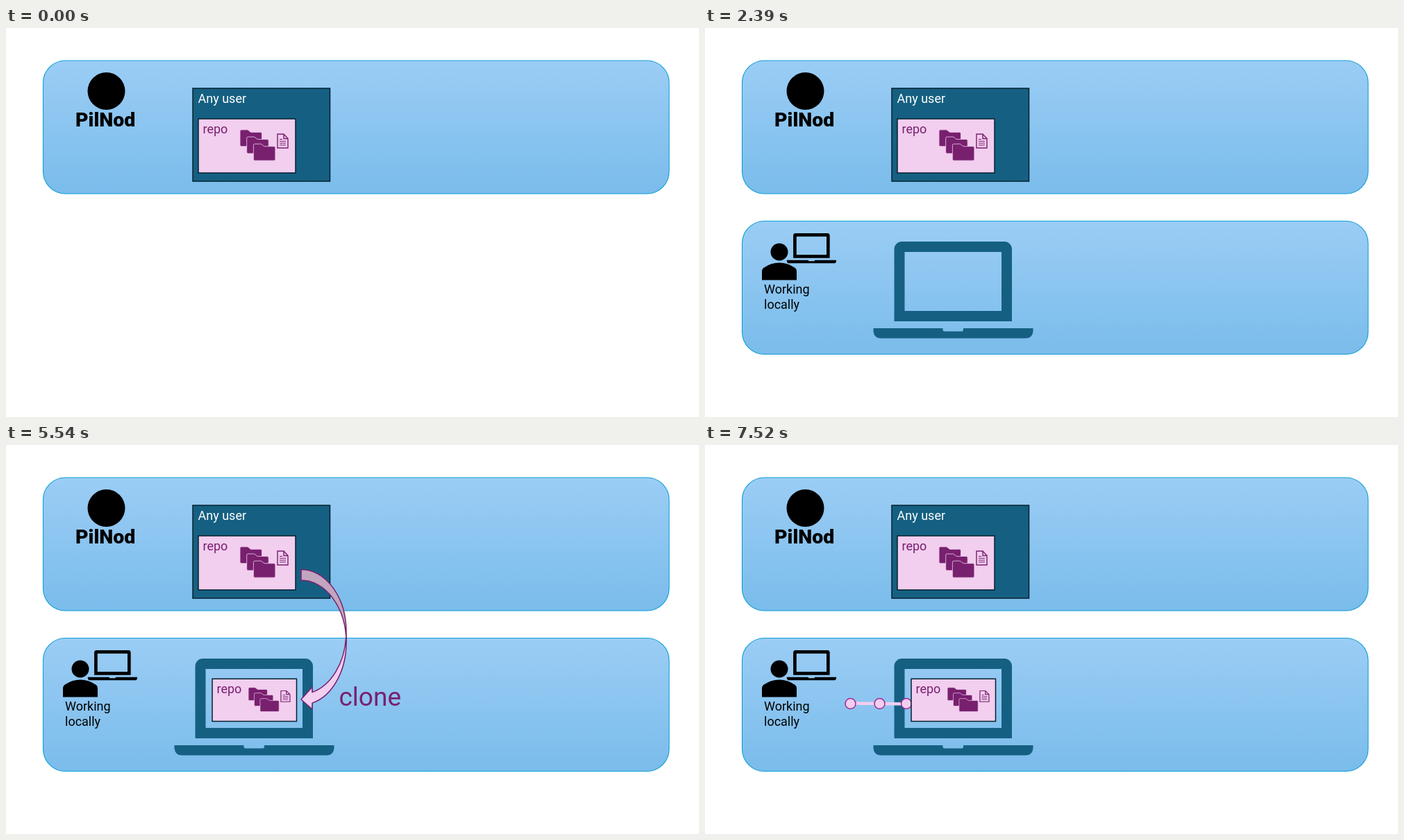
An HTML page with a canvas for the animation above (8000 ms loop, 998 px wide and 561 px high).

```html
<!DOCTYPE html>
<html lang="en">
<head>
<meta charset="utf-8">
<title>Cloning a repo</title>
<style>
  html, body { margin: 0; width: 100%; height: 100%; overflow: hidden; background: #fff; }
  canvas { display: block; }
</style>
</head>
<body>
<canvas id="stage" width="998" height="561"></canvas>
<script>
const ctx = document.getElementById('stage').getContext('2d');
const LOOP = 8000;
const STARTS = { local: 500, clone: 3650, history: 6800 };
const TEAL = '#156082', PURPLE = '#78206e', PINK = '#f2ceef', DARK = '#06202e';

function paint(fill, stroke, width = 1.5) {
  if (fill) { ctx.fillStyle = fill; ctx.fill(); }
  if (stroke) { ctx.strokeStyle = stroke; ctx.lineWidth = width; ctx.stroke(); }
}

function box(x, y, w, h, fill, stroke, width) {
  ctx.beginPath();
  ctx.rect(x, y, w, h);
  paint(fill, stroke, width);
}

function disc(x, y, r, fill, stroke, width) {
  ctx.beginPath();
  ctx.arc(x, y, r, 0, 2 * Math.PI);
  paint(fill, stroke, width);
}

function label(text, x, y, color, size = 18, weight = 400) {
  ctx.font = `${weight} ${size}px Roboto, sans-serif`;
  ctx.fillStyle = color;
  ctx.fillText(text, x, y);
}

function placed(x, y, sx, sy, draw) {
  ctx.save();
  ctx.translate(x, y);
  ctx.scale(sx, sy);
  draw();
  ctx.restore();
}

function panel(y) {
  const shade = ctx.createLinearGradient(0, y, 0, y + 192);
  shade.addColorStop(0, '#9bcdf5');
  shade.addColorStop(1, '#7abceb');
  ctx.beginPath();
  ctx.roundRect(53.5, y, 901.5, 192, 32);
  paint(shade, '#0f9ed5', 1.1);
}

function folder(x, y) {
  ctx.beginPath();
  ctx.moveTo(x, y + 2);
  ctx.quadraticCurveTo(x, y, x + 2, y);
  ctx.lineTo(x + 11, y);
  ctx.lineTo(x + 15.5, y + 3.5);
  ctx.lineTo(x + 29.5, y + 3.5);
  ctx.quadraticCurveTo(x + 31.5, y + 3.5, x + 31.5, y + 5.5);
  ctx.lineTo(x + 31.5, y + 22);
  ctx.quadraticCurveTo(x + 31.5, y + 24, x + 29.5, y + 24);
  ctx.lineTo(x + 2, y + 24);
  ctx.quadraticCurveTo(x, y + 24, x, y + 22);
  ctx.closePath();
  paint(PURPLE, PINK, 0.8);
}

function page(x, y) {
  ctx.beginPath();
  ctx.moveTo(x, y);
  ctx.lineTo(x + 9, y);
  ctx.lineTo(x + 15, y + 6.5);
  ctx.lineTo(x + 15, y + 20);
  ctx.lineTo(x, y + 20);
  ctx.closePath();
  ctx.moveTo(x + 9, y);
  ctx.lineTo(x + 9, y + 6.5);
  ctx.lineTo(x + 15, y + 6.5);
  paint(null, PURPLE, 1.4);
  ctx.beginPath();
  [7.5, 10.3, 13.1, 15.9].forEach((dy, i) => {
    ctx.moveTo(x + 3, y + dy);
    ctx.lineTo(x + (i ? 12 : 7), y + dy);
  });
  paint(null, PURPLE, 1);
}

function repo(x, y, w, h) {
  box(x, y, w, h, PINK, DARK, 1.5);
  placed(x, y, w / 140, h / 78, () => {
    for (let i = 0; i < 3; i++) folder(60 + 9.7 * i, 15.8 + 10.2 * i);
    page(114, 22);
  });
  label('repo', x + 6.5, y + 21, PURPLE);
}

function laptop(x, y, scale, color) {
  placed(x, y, scale, scale, () => {
    ctx.beginPath();
    ctx.roundRect(30, 0, 169.5, 115, [11, 11, 0, 0]);
    ctx.rect(45, 15, 139.5, 85);
    ctx.fillStyle = color;
    ctx.fill('evenodd');
    ctx.beginPath();
    ctx.moveTo(0, 125);
    ctx.lineTo(100, 125);
    ctx.lineTo(100, 127);
    ctx.quadraticCurveTo(100, 129.5, 102.5, 129.5);
    ctx.lineTo(127, 129.5);
    ctx.quadraticCurveTo(129.5, 129.5, 129.5, 127);
    ctx.lineTo(129.5, 125);
    ctx.lineTo(230, 125);
    ctx.lineTo(230, 129.5);
    ctx.quadraticCurveTo(229, 139.5, 219, 139.5);
    ctx.lineTo(11, 139.5);
    ctx.quadraticCurveTo(1, 139.5, 0, 129.5);
    ctx.closePath();
    ctx.fill();
  });
}

function person() {
  disc(107, 323, 12.5, '#000');
  ctx.beginPath();
  ctx.moveTo(82, 363.5);
  ctx.lineTo(82, 351);
  ctx.quadraticCurveTo(82, 347.5, 85, 345.5);
  ctx.quadraticCurveTo(95, 338.5, 107, 338.5);
  ctx.quadraticCurveTo(119, 338.5, 129, 345.5);
  ctx.quadraticCurveTo(132, 347.5, 132, 351);
  ctx.lineTo(132, 363.5);
  paint('#000');
}

// A ribbon between two equal ellipses, one set below the other.
function cloneArrow() {
  const x = 425, rx = 65, ry = 89.9, upper = 269.4, lower = 285;
  const cross = Math.asin((lower - upper) / 2 / ry);
  const neck = Math.acos(16 / rx);
  const arc = (cy, from, to) => ctx.ellipse(x, cy, rx, ry, 0, from, to, to < from);
  ctx.lineJoin = 'round';
  ctx.beginPath();
  arc(upper, -Math.PI / 2, 0);
  arc(lower, 0, -Math.PI / 2);
  ctx.closePath();
  paint('#c2a5bf', PURPLE, 1.5);
  ctx.beginPath();
  arc(lower, -cross, neck);
  ctx.lineTo(441, 381);
  ctx.lineTo(x, 367);
  ctx.lineTo(441, 349);
  arc(upper, neck, cross);
  ctx.closePath();
  paint(PINK, PURPLE, 1.5);
  ctx.lineJoin = 'miter';
}

function commits() {
  ctx.beginPath();
  ctx.moveTo(209.5, 372.5);
  ctx.lineTo(290, 373.5);
  paint(null, PINK, 4.5);
  for (const x of [209.5, 251.5, 290]) disc(x, 373, 7.5, PINK, '#a02b93', 1.5);
}

function remoteScene() {
  panel(47);
  disc(144.5, 91, 27, '#000');
  label('PilNod', 100, 141.5, '#000', 28.5, 900);
  box(269, 87, 197.5, 134, TEAL, DARK, 1.5);
  label('Any user', 276.5, 108, '#fff');
  repo(277, 131, 140, 78);
}

function localScene() {
  panel(278.5);
  person();
  laptop(117.8, 296, 0.31, '#000');
  label('Working', 85, 382.5, '#000');
  label('locally', 85, 404.5, '#000');
  laptop(242.5, 308, 1, TEAL);
}

function draw(now) {
  const t = now % LOOP;
  ctx.fillStyle = '#fff';
  ctx.fillRect(0, 0, 998, 561);
  remoteScene();
  if (t >= STARTS.local) localScene();
  if (t >= STARTS.history) commits();
  if (t >= STARTS.clone) repo(297, 337.3, 121.5, 61.2);
  if (t >= STARTS.clone && t < STARTS.history) {
    cloneArrow();
    label('clone', 479.5, 376, PURPLE, 37);
  }
}

const begin = performance.now();
function tick() {
  draw(performance.now() - begin);
  requestAnimationFrame(tick);
}
tick();
</script>
</body>
</html>
```
